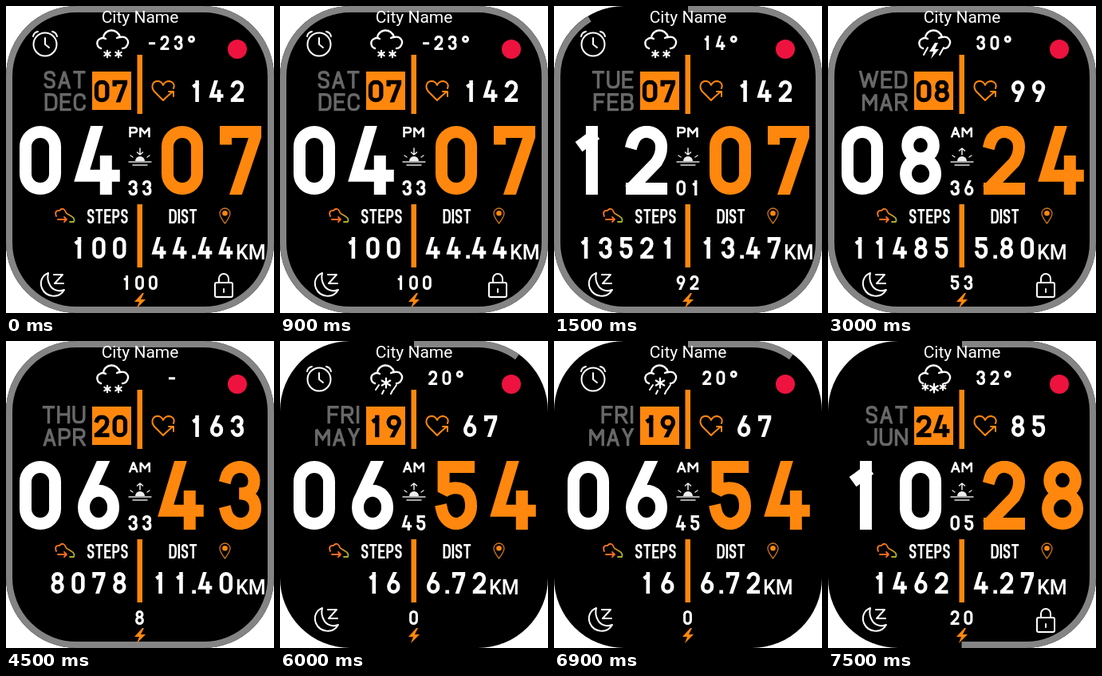
Write an HTML page with a canvas that moves like this. It is 336 by 384 pixels and loops after 8 s.

```html
<!DOCTYPE html>
<html lang="en">
<head>
<meta charset="utf-8">
<title>Watch face</title>
<style>
  html, body { margin: 0; width: 100%; height: 100%; overflow: hidden; background: #fff; }
  canvas { display: block; }
</style>
</head>
<body>
<canvas id="face" width="336" height="384"></canvas>
<script>
const ctx = document.getElementById('face').getContext('2d');
const ORANGE = '#ff870d', WHITE = '#fff', GREY = '#686868';
const STEP = 1500, LOOP = 8000;

// Lettering: [width / height, centre line in a unit box]
const GLYPHS = {
  0: [.605, 'M0 .26A.5 .26 0 0 1 1 .26V.74A.5 .26 0 0 1 0 .74Z'],
  1: [.605, 'M.62 0V1M.6 .1L.34 .2'],
  2: [.605, 'M.017 .19A.5 .26 0 0 1 1 .26C1 .38 .94 .44 .84 .53L.06 .95M0 1H1'],
  3: [.605, 'M.016 .178A.48 .24 0 0 1 .96 .24C.96 .4 .8 .47 .45 .47C.8 .47 1 .56 1 .73A.5 .27 0 0 1 .017 .8'],
  4: [.605, 'M.43 -.08L-.06 .77H1.02M.75 .52V1'],
  5: [.605, 'M.92 0H.07V.44C.2 .39 .32 .37 .46 .37C.82 .37 1 .48 1 .69A.5 .31 0 0 1 .017 .77'],
  6: [.605, 'M.64 -.08L.1 .53M0 .71A.5 .29 0 1 1 1 .71A.5 .29 0 1 1 0 .71Z'],
  7: [.605, 'M0 .12V0H1V.08L.35 1.08'],
  8: [.605, 'M.06 .235A.44 .235 0 1 1 .94 .235A.44 .235 0 1 1 .06 .235ZM0 .735A.5 .265 0 1 1 1 .735A.5 .265 0 1 1 0 .735Z'],
  9: [.605, 'M.36 1.08L.9 .47M0 .29A.5 .29 0 1 1 1 .29A.5 .29 0 1 1 0 .29Z'],
  '.': [-.135, 'M.3 1h.01'], // tucks into the gap between digits
  '-': [.45, 'M0 .55H1'],
  '°': [.5, 'M0 .2A.5 .2 0 1 1 1 .2A.5 .2 0 1 1 0 .2Z'],
  A: [.72, 'M0 1.05L.5 -.04L1 1.05M.17 .7H.83'],
  B: [.71, 'M0 0V1H.6C.86 1 1 .9 1 .74C1 .57 .86 .48 .6 .48H0H.58C.82 .48 .94 .39 .94 .24C.94 .09 .82 0 .58 0Z'],
  C: [.68, 'M1 .24C.98 .1 .8 0 .52 0C.2 0 0 .12 0 .32V.68C0 .88 .2 1 .52 1C.8 1 .98 .9 1 .76'],
  D: [.71, 'M0 0V1H.5C.85 1 1 .87 1 .66V.34C1 .13 .85 0 .5 0Z'],
  E: [.63, 'M1 0H0V1H1M0 .48H.85'],
  F: [.63, 'M1 0H0V1M0 .48H.85'],
  H: [.72, 'M0 0V1M1 0V1M0 .48H1'],
  I: [.17, 'M.5 0V1'],
  J: [.58, 'M1 0V.7C1 .9 .85 1 .5 1C.25 1 .08 .94 0 .82'],
  M: [.84, 'M0 1V0L.5 .62L1 0V1'],
  N: [.72, 'M0 1V0L1 1V0'],
  P: [.68, 'M0 1V0H.55C.85 0 1 .1 1 .28S.85 .55 .55 .55H0'],
  R: [.71, 'M0 1V0H.55C.83 0 .97 .1 .97 .26S.83 .52 .55 .52H0M.5 .52L1 1.04'],
  S: [.64, 'M1 .2C.96 .07 .8 0 .5 0C.2 0 0 .08 0 .24C0 .4 .18 .45 .5 .48C.84 .51 1 .59 1 .75C1 .92 .8 1 .5 1C.22 1 .05 .93 0 .82'],
  T: [.68, 'M0 0H1M.5 0V1'],
  U: [.72, 'M0 0V.7C0 .9 .2 1 .5 1S1 .9 1 .7V0'],
  W: [1.09, 'M0 -.05L.25 1L.5 .08L.75 1L1 -.05'],
  Y: [.66, 'M0 -.05L.5 .55L1 -.05M.5 .55V1']
};
for (const glyph of Object.values(GLYPHS)) glyph[1] = new Path2D(glyph[1]);

const STATES = [
  { hour: '04', minute: '07', second: '33', half: 'PM', week: 'SAT', month: 'DEC', day: '07', temp: '-23°', sky: 'snow',
    pulse: '142', steps: '100', dist: '44.44', power: '100', ring: 1, alarm: true, moon: true, lock: true },
  { hour: '12', minute: '07', second: '01', half: 'PM', week: 'TUE', month: 'FEB', day: '07', temp: '14°', sky: 'snow',
    pulse: '142', steps: '13521', dist: '13.47', power: '92', ring: .9, alarm: true, moon: true },
  { hour: '08', minute: '24', second: '36', half: 'AM', week: 'WED', month: 'MAR', day: '08', temp: '30°', sky: 'storm',
    pulse: '99', steps: '11485', dist: '5.80', power: '53', ring: 1, moon: true, lock: true },
  { hour: '06', minute: '43', second: '33', half: 'AM', week: 'THU', month: 'APR', day: '20', temp: '-', sky: 'snow',
    pulse: '163', steps: '8078', dist: '11.40', power: '8', ring: 1 },
  { hour: '06', minute: '54', second: '45', half: 'AM', week: 'FRI', month: 'MAY', day: '19', temp: '20°', sky: 'sleet',
    pulse: '67', steps: '16', dist: '6.72', power: '0', ring: .105, alarm: true, moon: true },
  { hour: '10', minute: '28', second: '05', half: 'AM', week: 'SAT', month: 'JUN', day: '24', temp: '32°', sky: 'blizzard',
    pulse: '85', steps: '1462', dist: '4.27', power: '20', ring: .5, moon: true, lock: true }
];

// align: 0 left, .5 centre, 1 right; returns the right edge
function letter(str, x, y, h, { color = WHITE, weight = h * .17, gap = h * .355, align = 0, squeeze = 1 } = {}) {
  const glyphs = [...str].map(c => GLYPHS[c]);
  const widths = glyphs.map(g => g[0] * h * squeeze);
  const total = widths.reduce((a, b) => a + b) + gap * (str.length - 1);
  const line = new Path2D();
  let left = x - total * align;
  glyphs.forEach((g, i) => {
    line.addPath(g[1], new DOMMatrix([widths[i] - weight, 0, 0, h - weight, left + weight / 2, y + weight / 2]));
    left += widths[i] + gap;
  });
  ctx.save();
  // Cuts slanted strokes level with the top and the baseline
  ctx.beginPath();
  ctx.rect(0, y, 336, h);
  ctx.clip();
  ctx.lineCap = 'square';
  ctx.lineJoin = 'miter';
  ctx.miterLimit = 2;
  ctx.lineWidth = weight;
  ctx.strokeStyle = color;
  ctx.stroke(line);
  ctx.restore();
  return left - gap;
}

function icon(path, color = WHITE, width = 2) {
  ctx.lineCap = ctx.lineJoin = 'round';
  ctx.lineWidth = width;
  ctx.strokeStyle = color;
  ctx.stroke(new Path2D(path));
}

function shape(path, color) {
  ctx.fillStyle = color;
  ctx.fill(new Path2D(path));
}

function label(str, x, y, font, align) {
  ctx.font = `${font} Roboto, sans-serif`;
  ctx.textAlign = align;
  ctx.fillStyle = WHITE;
  ctx.fillText(str, x, y);
}

function fade(x0, y0, x1, y1, from, to) {
  const gradient = ctx.createLinearGradient(x0, y0, x1, y1);
  gradient.addColorStop(.4, from);
  gradient.addColorStop(1, to);
  return gradient;
}

function flake(x, y, r) {
  for (let i = 0; i < 3; i++) {
    const a = Math.PI * (i / 3 + .5), dx = r * Math.cos(a), dy = r * Math.sin(a);
    icon(`M${x - dx} ${y - dy}L${x + dx} ${y + dy}`, WHITE, 2.2);
  }
}

function drawSky(kind) {
  icon('M119 53C113 51 113 43 118 41Q121 39 125 41M122 40C123 28 140 27 143 39C151 37 155 44 152 49Q150 53 146 53M139 40Q141 39 143 39', WHITE, 2.4);
  if (kind === 'snow') [127, 141].forEach(x => flake(x, 60, 4.2));
  if (kind === 'blizzard') { flake(122, 57.5, 3.8); flake(133, 59, 5.5); flake(144, 57.5, 3.8); }
  if (kind === 'sleet') { flake(133, 52.5, 6); icon('M124 55L120 61M146 55L142 61M130 62L128 66M141 62L139 66'); }
  if (kind === 'storm') {
    shape('M134 46L127 57H132L129 66L139 54H134L138 46Z', WHITE);
    icon('M125 52L120 61M145 52L140 61');
  }
}

function drawBody(level) {
  ctx.fillStyle = WHITE;
  ctx.fillRect(0, 0, 336, 384);
  ctx.beginPath();
  ctx.roundRect(0, 0, 336, 384, 88);
  ctx.fillStyle = '#000';
  ctx.fill();
  const length = 736 + 168 * Math.PI;
  ctx.save();
  ctx.setLineDash([length * level + (level === 1 ? 9 : 0), length]);
  ctx.lineCap = 'butt';
  ctx.lineWidth = 8;
  ctx.strokeStyle = '#848484';
  ctx.stroke(new Path2D('M168 4H248A84 84 0 0 1 332 88V296A84 84 0 0 1 248 380H88A84 84 0 0 1 4 296V88A84 84 0 0 1 88 4Z'));
  ctx.restore();
}

function drawFixed() {
  label('City Name', 168, 21, '21px', 'center');
  ctx.fillStyle = ORANGE;
  ctx.fillRect(164.5, 61, 6.5, 74);
  ctx.fillRect(164.5, 248, 6.5, 79);
  ctx.fillRect(108, 82, 49, 48);
  shape('M290 42a12 12 0 1 1 0 24a12 12 0 1 1 0-24Z', '#ee123f');
  icon('M200 115L197 118L186 107C181 101 184 94 190 94Q195 94 197 99Q199 94 205 94C210 95 212 99 210 103M200 115L209 107M204 107H210V113', ORANGE);
  const shoe = fade(62, 256, 86, 268, '#ff7a1c', '#9ab52e');
  icon('M63 263C61 258 63 255 67 256Q69 253 72 254C75 255 74 259 77 260L82 263Q87 266 85 270H80', shoe, 1.8);
  icon('M65 267H76M73 264L76 267L73 270', '#ff6b20', 1.8);
  icon('M274.500 272C270 266 268 263 268 259.500A6.500 6.500 0 0 1 281 259.500C281 263 279 266 274.500 272Z', '#c9741a', 1.3);
  shape('M274.500 256a3.300 3.300 0 1 1 0 6.600a3.300 3.300 0 1 1 0-6.600Z', ORANGE);
  shape('M171 359L161 370H167L164 378L175 367H169L173 359Z', ORANGE);
  const caption = { gap: 1.8, squeeze: .74, weight: 2.6 };
  letter('STEPS', 102, 254, 18, caption);
  letter('DIST', 204.5, 254, 18, caption);
}

function drawSun(half) {
  shape('M162 194A6 6 0 0 1 174 194Z', '#eee');
  icon('M154 195H182M159 199H177M156 187L159 189M180 187L177 189', '#ddd', 1.4);
  icon('M168 178V186' + (half === 'AM' ? 'M164.500 181L168 178L171.500 181' : 'M164.500 183L168 186L171.500 183'), '#eee', 1.5);
}

function drawIcons(s) {
  if (s.alarm) icon('M49 33.500a14.500 14.500 0 1 1 0 29a14.500 14.500 0 1 1 0-29M49 40V48L54 52M34 38Q35 33 40 32M58 32Q63 33 64 38');
  if (s.moon) icon('M53 334C45 337 42 345 45 353C50 364 66 367 73 355C66 358 58 355 55 349Q51 342 53 334ZM60 336H71L61 347H72');
  if (s.lock) icon('M264 346H282Q284 346 284 348V362Q284 364 282 364H264Q262 364 262 362V348Q262 346 264 346M267 346V341A6 6 0 0 1 279 341V346M273 354V358');
}

function draw(s) {
  drawBody(s.ring);
  drawFixed();
  drawIcons(s);
  drawSky(s.sky);
  drawSun(s.half);

  letter(s.hour, 17, 150, 86, { gap: 21, weight: 15 });
  letter(s.minute, 195, 150, 86, { gap: 21, weight: 15, color: ORANGE });
  letter(s.half, 167.5, 151, 13.5, { gap: 1.8, weight: 2.5, align: .5, squeeze: 1.2 });
  letter(s.second, 168, 218, 19, { gap: 6, align: .5 });

  const dateStyle = { color: GREY, weight: 3.4, gap: 3, align: 1 };
  letter(s.week, 99.5, 81, 22.5, dateStyle);
  letter(s.month, 100, 109, 22.5, dateStyle);
  letter(s.day, 131.5, 92.5, 28, { color: '#000', weight: 5.3, gap: 4, align: .5, squeeze: 1.1 });

  letter(s.temp, 208, 37, 18, { align: .5 });
  letter(s.pulse, 230, 93, 27);
  letter(s.steps, 150.5, 289, 27, { align: 1 });
  const edge = letter(s.dist, 184, 289, 27);
  label('KM', edge + 4, 317, '500 25px', 'left');
  letter(s.power, 167.5, 337, 18, { gap: 6, align: .5 });
}

function frame() {
  draw(STATES[Math.floor(performance.now() % LOOP / STEP)]);
  requestAnimationFrame(frame);
}
frame();
</script>
</body>
</html>
```
